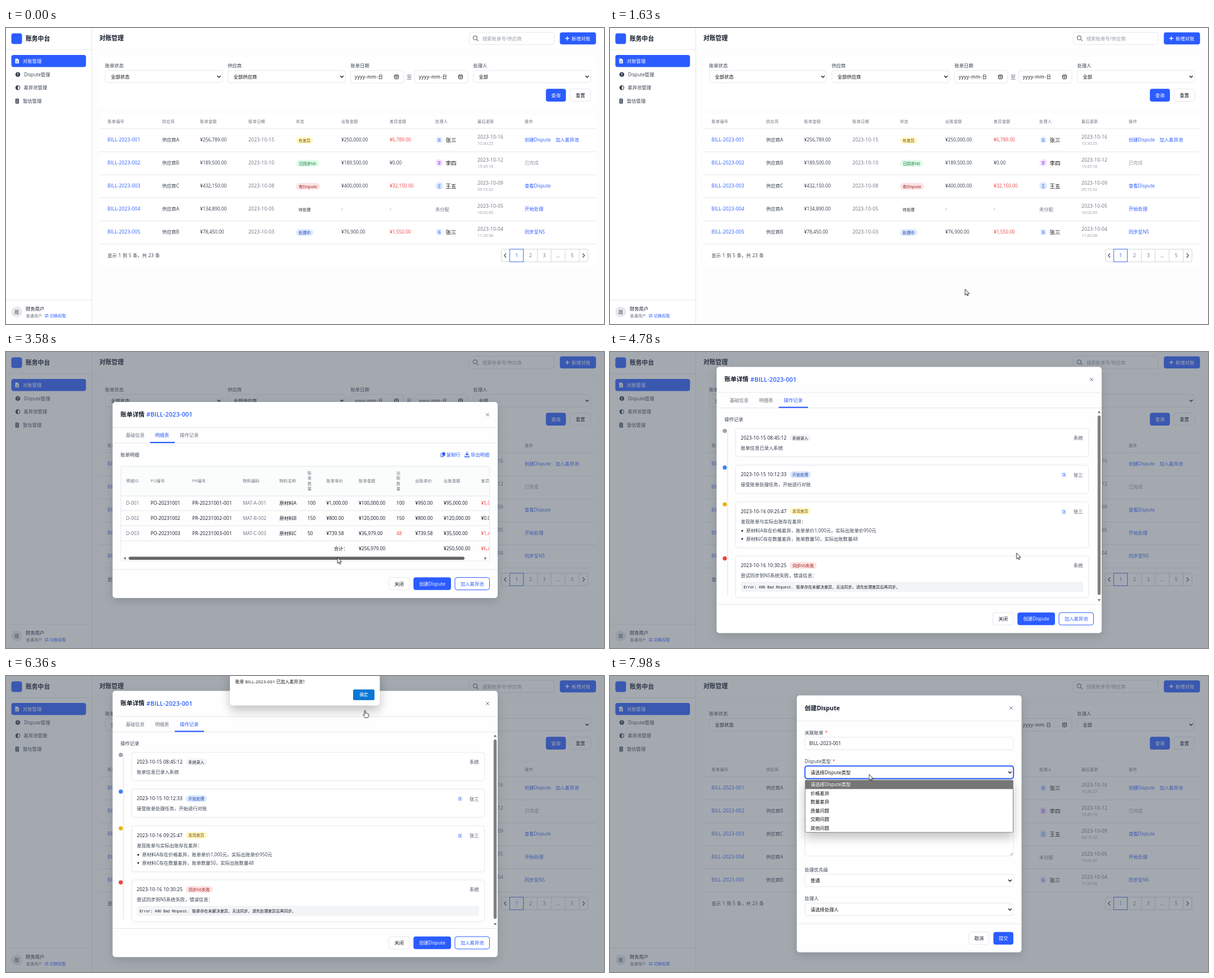
An HTML page for the animation above (8 s loop, 1063x527 px).

```html
<!DOCTYPE html>
<html lang="zh-CN">
<head>
<meta charset="utf-8">
<title>账务中台</title>
<style>
html, body { margin: 0; width: 100%; height: 100%; overflow: hidden; background: #fff; }
svg { display: block; width: 100%; height: 100%; }
text { font-family: "Open Sans", "Noto Sans CJK SC", "Noto Sans CJK", sans-serif; white-space: pre; }
.mono { font-family: "Liberation Mono", "Noto Sans CJK SC", monospace; }
.panel { filter: drop-shadow(0 5px 8px rgba(0, 0, 0, .14)); }
.popup { filter: drop-shadow(0 9px 9px rgba(0, 0, 0, .24)); }
</style>
</head>
<body>
<svg id="stage" viewBox="0 0 1063 527"></svg>
<script>
const LOOP = 8000;
const BLUE = '#2b5cff', INK = '#111827', TEXT = '#374151', GREY = '#6b7280', PALE = '#9299a5',
      LINE = '#e5e7eb', RED = '#ef4444';

// Drawing helpers; text is placed by its vertical middle.
const text = (x, y, str, fill = TEXT, size = 8.3, extra = '') =>
  `<text x="${x}" y="${y + size * .37}" font-size="${size}" fill="${fill}" ${/\d-\d/.test(str) ? 'letter-spacing=".16"' : ''} ${extra}>${str}</text>`;
const mid = (x, y, str, fill, size, extra = '') => text(x, y, str, fill, size, 'text-anchor="middle" ' + extra);
const MEDIUM = 'font-weight="500"', BOLD = 'font-weight="700"';
const rect = (x, y, w, h, fill, stroke = 'none', r = 4, extra = '') =>
  `<rect x="${x}" y="${y}" width="${w}" height="${h}" rx="${r}" fill="${fill}" stroke="${stroke}" ${extra}/>`;
const hline = (x1, x2, y, color = LINE) => `<path d="M${x1} ${y}H${x2}" stroke="${color}"/>`;
const dot = (x, y, r, fill) => `<circle cx="${x}" cy="${y}" r="${r}" fill="${fill}"/>`;
const stroke = (d, color = '#111', w = 1.2) =>
  `<path d="${d}" fill="none" stroke="${color}" stroke-width="${w}" stroke-linecap="round" stroke-linejoin="round"/>`;
const shape = (d, fill) => `<path d="${d}" fill="${fill}"/>`;

const button = (x, y, w, h, label, kind = 'plain') => {
  const [bg, border, ink] = {
    primary: [BLUE, 'none', '#fff'], plain: ['#fff', LINE, INK], outline: ['#fff', BLUE, BLUE]
  }[kind];
  return rect(x, y, w, h, bg, border) + mid(x + w / 2, y + h / 2, label, ink, 8.3, MEDIUM);
};
const box = (x, y, w, h = 22.5) => rect(x, y, w, h, '#fff', LINE);
const input = (x, y, w, str, fill = PALE) => box(x, y, w) + text(x + 7.5, y + 11, str, fill);
const select = (x, y, w, str) => box(x, y, w, 22) + text(x + 10, y + 11, str, '#111') +
  stroke(`M${x + w - 8.5} ${y + 10}l2.5 2.5 2.5 -2.5`, '#111', 1.3);
const dateInput = (x, y, w) => box(x, y, w) + text(x + 7.5, y + 11.5, 'yyyy-mm-日', '#111', 8.3, 'letter-spacing=".5"') +
  rect(x + w - 16.5, y + 8, 7, 7, 'none', '#222', 1) +
  stroke(`M${x + w - 16.5} ${y + 10.2}h7M${x + w - 14.5} ${y + 12.6}h3`, '#222', 1);
const textarea = (y, h, str) => box(346.5, y, 370.5, h) + text(353.5, y + 11.5, str, PALE) +
  stroke(`M711.5 ${y + h - 1.5}l4 -4M714 ${y + h - 1.5}l1.5 -1.5`, '#666', .7);
const label = (x, y, str, required) =>
  text(x, y, str + (required ? `<tspan dx="3" fill="${RED}">*</tspan>` : ''));
const tint = {
  yellow: ['#fef9c3', '#854d0e'], green: ['#dcfce7', '#166534'], red: ['#fee2e2', '#991b1b'],
  blue: ['#dbeafe', '#1e40af'], grey: ['#f3f4f6', '#1f2937'], none: ['none', '#1f2937']
};
const badge = (x, y, w, str, color) =>
  rect(x, y - 6, w, 12, tint[color][0], 'none', 6) + mid(x + w / 2, y, str, tint[color][1], 7.1, MEDIUM);
const group = (id, body) => `<g id="${id}">${body}</g>`;

function sidebar() {
  const item = (x, y, str) => text(x, y, str, TEXT, 8.3);
  return rect(0, 0, 152, 527, '#fff', 'none', 0) + `<path d="M152.5 0V527" stroke="${LINE}"/>` +
    rect(9.5, 9.5, 19, 19, BLUE) + text(35, 19, '账务中台', INK, 10.8, BOLD) +
    hline(0, 152, 38.5) + rect(9.5, 48.1, 132.7, 21.4, BLUE) +
    shape('M16.5 54.5h4l2.5 2.5v6h-6.5z', '#fff') + stroke('M18.3 59h3M18.3 61h3', BLUE, .8) +
    text(30, 58.7, '对账管理', '#fff', 8.3, MEDIUM) +
    dot(21, 82.7, 4.3, TEXT) + stroke('M21 80.3v2.6M21 84.8v.1', '#fff', 1.1) + item(32, 82.7, 'Dispute管理') +
    dot(21, 106.3, 4.2, TEXT) + shape('M21 103.2a3.1 3.1 0 0 1 0 6.2z', '#fff') + item(31.5, 106.3, '差异池管理') +
    rect(16.7, 125.8, 6.3, 8.6, TEXT, 'none', 1) + stroke('M18.2 127.7h3.4M18.4 130.2h3M18.4 132.3h3', '#fff', .8) +
    item(30, 130.2, '暂估管理') +
    hline(0, 152, 484.5) + dot(19, 505.5, 9.5, LINE) + mid(19, 505.5, '用', TEXT, 8.3) +
    text(35, 499.5, '财务用户', INK, 8.3) + text(35.5, 512.3, '普通用户', GREY, 7.1) +
    stroke('M69 510.8h6l-1.5 -1.5M75.5 513.8h-6l1.5 1.5', BLUE, 1) + text(78, 512.3, '切换权限', BLUE, 7.1);
}

const COLS = [180.5, 277.5, 345, 431, 515.5, 596, 682, 763, 838, 922];
const BILLS = [
  ['A', '256,789', '10-15', ['有差异', 30.5, 'yellow'], '¥250,000.00', '¥6,789.00', '张', '三', '16', '10:30:25', '创建Dispute', '加入差异池'],
  ['B', '189,500', '10-10', ['已同步NS', 41, 'green'], '¥189,500.00', '¥0.00', '李', '四', '12', '15:45:18', '已完成'],
  ['C', '432,150', '10-08', ['有Dispute', 42.5, 'red'], '¥400,000.00', '¥32,150.00', '王', '五', '09', '09:15:32', '查看Dispute'],
  ['A', '134,890', '10-05', ['待处理', 30.5, 'none'], '-', '-', '', '', '05', '16:02:45', '开始处理'],
  ['B', '78,450', '10-03', ['处理中', 30.5, 'blue'], '¥76,900.00', '¥1,550.00', '张', '三', '04', '11:20:38', '同步至NS']
];
const AVATAR = { 张: ['#f1f6ff', BLUE], 李: ['#f3e8ff', '#9333ea'], 王: ['#dbeafe', '#2563eb'] };

function billRow([vendor, sum, date, [state, w, color], paid, diff, family, given, day, time, action, extra = ''], i) {
  const y = 199 + 41 * i, [bg, ink] = AVATAR[family] || [];
  return text(COLS[0], y, `BILL-2023-00${i + 1}`, BLUE, 8.5) + text(COLS[1], y, '供应商' + vendor) +
    text(COLS[2], y, `¥${sum}.00`, TEXT, 8.4) + text(COLS[3], y, '2023-' + date, GREY, 8.5) +
    badge(COLS[4], y + 1, w, state, color) + text(COLS[5], y, paid, TEXT, 8.4) +
    text(COLS[6], y, diff, /[1-9]/.test(diff) ? RED : TEXT, 8.4) +
    (family ? dot(770, y, 6.8, bg) + mid(770, y, family, ink, 7.1) + text(781.5, y + .5, family + given, '#111', 9.5)
            : text(COLS[7], y + .5, '未分配', GREY)) +
    text(COLS[8], y - 5, '2023-10-' + day, GREY, 8.5) + text(COLS[8], y + 6, time, PALE, 7.1) +
    text(COLS[9], y, action, i === 1 ? PALE : BLUE) + text(977, y, extra, BLUE) + hline(166, 1048, y + 21.5);
}

function page() {
  const heads = ['账单编号', '供应商', '账单金额', '账单日期', '状态', '出账金额', '差异金额', '处理人', '最后更新', '操作'];
  const pages = ['', 1, 2, 3, '...', 5, ''];
  const edges = [880.5, 895.5, 920, 944.5, 969, 994, 1019, 1034.5];
  return rect(0, 0, 1063, 527, '#fdfdfd', 'none', 0) + rect(152, 0, 911, 37.5, '#fff', 'none', 0) +
    rect(166, 52, 882.5, 90, '#fff') + rect(166, 153, 882.5, 273, '#fff') + sidebar() +
    text(166, 18.5, '对账管理', INK, 10.8, BOLD) +
    box(823.5, 7.5, 151, 22) + stroke('M837 20.6l2.3 2.3', GREY, 1.3) +
    `<circle cx="834" cy="17.6" r="3.5" fill="none" stroke="${GREY}" stroke-width="1.2"/>` +
    text(847, 18.5, '搜索账单号/供应商', PALE) + addButton(BLUE) +
    [['账单状态', 176], ['供应商', 394], ['账单日期', 612.5], ['处理人', 830.5]].map(([s, x]) => label(x, 66.7, s)).join('') +
    select(176.5, 75.5, 208, '全部状态') + select(394.5, 75.5, 208.5, '全部供应商') +
    dateInput(612.5, 75.5, 94.5) + text(712, 87, '至', GREY, 9.5) + dateInput(726.5, 75.5, 94.5) +
    select(830.5, 75.5, 208.5, '全部') +
    button(959.7, 108.3, 35.6, 22.6, '查询', 'primary') + button(1002.5, 108.5, 37, 22, '重置') +
    heads.map((s, i) => text(COLS[i], 166.3, s, GREY, 7.1, 'letter-spacing=".36"')).join('') + hline(166, 1048, 179) +
    BILLS.map(billRow).join('') +
    text(180.5, 405, '显示 1 到 5 条，共 23 条', TEXT, 8.3, 'word-spacing=".5"') +
    rect(880.5, 393.8, 154, 22.4, '#fff', '#d1d5db', 3) +
    pages.map((s, i) => (i ? `<path d="M${edges[i]} 394v22" stroke="#d1d5db"/>` : '') +
      mid((edges[i] + edges[i + 1]) / 2, 405, s, s === 1 ? BLUE : GREY, 8.3)).join('') +
    rect(895.3, 393.8, 24.4, 22.4, 'none', BLUE, 0, 'stroke-width=".8"') +
    stroke('M888.7 401.8l-3 3.2 3 3.2M1025.4 401.8l3 3.2 -3 3.2', '#4b5563', 1.3);
}
const addButton = fill => rect(984.5, 7.8, 64.3, 21.4, fill) + stroke('M994.7 18.5h6M997.7 15.5v6', '#fff', 1.3) +
  text(1005.5, 18.5, '新增对账', '#fff', 8.3, MEDIUM);

// Modals
const modal = (x, y, w, h) => rect(0, 0, 1063, 527, '#4b5563', 'none', 0, 'opacity=".5"') +
  rect(x, y, w, h, '#fefefe', 'none', 5, 'class="panel"');
const cross = (x, y) => stroke(`M${x - 2.6} ${y - 2.6}l5.2 5.2m0 -5.2l-5.2 5.2`, GREY, 1);

function newBill() {
  return modal(332, 40, 399.5, 447) + text(346, 62.5, '新增对账单', INK, 10.7, BOLD) + hline(332, 731, 85.5) +
    label(346, 106, '供应商', 1) + select(346.5, 114.5, 178, '请选择供应商') +
    label(539, 106, '账单编号', 1) + input(539, 114.5, 178, '输入账单编号') +
    label(346, 157, '账单日期', 1) + dateInput(346.5, 165.5, 178) +
    label(539, 157, '账单金额', 1) + input(539, 165.5, 178, '输入金额') +
    label(346, 209.5, '币种', 1) + select(346.5, 218, 178, '人民币 (CNY)') +
    label(539, 209.5, '处理人') + input(539, 218, 178, '输入处理人姓名') +
    label(346, 260.5, '备注') + textarea(269, 46, '添加备注信息...') +
    label(346, 339, '账单文件上传') +
    rect(347, 348, 370, 72.5, 'none', '#d1d5db', 4, 'stroke-width="1.3" stroke-dasharray="3.5 2.2"') +
    shape('M524 379.5a6 6 0 0 1 -1.5 -11.5a8.5 8.5 0 0 1 15.5 -4.5a5 5 0 0 1 3.5 5.5a5.4 5.4 0 0 1 -2 10.5z', '#9ca3af') +
    stroke('M531.5 376v-8M528 371l3.5 -3.5 3.5 3.5', '#fff', 1.8) +
    mid(531.5, 392.7, '点击或拖拽文件上传', TEXT, 8.3) +
    mid(531.5, 405.5, '支持格式：PDF、Sheet、Text等，单个文件不超过10MB', PALE, 7.1) +
    hline(332, 731, 436) + button(613, 450.5, 36, 22, '取消') + button(656.5, 450.2, 60.5, 22.6, '创建对账单', 'primary');
}

function billModal(top, bottom, active, body) {
  const tabs = [['基础信息', 213, 203.5, 256], ['明细表', 265, 256, 300], ['操作记录', 309, 300, 352]];
  return modal(189.5, top, 684.5, bottom - top) + text(203.5, top + 22, '账单详情', INK, 10.7, BOLD) +
    text(249.5, top + 22, '#BILL-2023-001', BLUE, 10.9, 'font-weight="600"') + cross(856, top + 22.5) +
    hline(189.5, 874, top + 45.5) + hline(189.5, 874, top + 73) +
    tabs.map(([s, x, a, b], i) => text(x, top + 59.3, s, i === active ? BLUE : GREY, 8.3, MEDIUM) +
      (i === active ? rect(a, top + 71, b - a, 2.2, BLUE, 'none', 0) : '')).join('') + body +
    hline(189.5, 874, bottom - 51) + button(680.5, bottom - 36.5, 36.5, 22, '关闭') +
    button(724.3, bottom - 36.8, 66.7, 22.6, '创建Dispute', 'primary') +
    button(798, bottom - 36.5, 61.5, 22, '加入差异池', 'outline');
}

function infoBody() {
  const fields = [['账单编号', 'BILL-2023-001'], ['供应商', '供应商A'], ['账单日期', '2023-10-15'], ['处理人', '张三'],
    ['账单金额', '¥256,789.00'], ['出账金额', '¥250,000.00'], ['差异金额', '¥6,789.00'], ['币种', '人民币 (CNY)']];
  return text(203.5, 155, '账单信息', TEXT, 8.3, MEDIUM) + fields.map(([k, v], i) => {
    const x = 203.5 + 328 * (i % 2), y = 180 + 56 * (i >> 1);
    return text(x, y, k, GREY) + text(x, y + 15, v, k === '差异金额' ? RED : INK);
  }).join('');
}

function detailBody() {
  const xs = [213.5, 257, 331, 421, 486, 536, 569.5, 627, 694, 727.5, 778, 844.5];
  const heads = ['明细ID', 'PO编号', 'PR编号', '物料编码', '物料名称', '账单数量', '账单单价', '账单金额', '出账数量', '出账单价', '出账金额', '差异金额'];
  const rows = [['A', 100, '1,000.00', '100,000.00', 100, '950.00', '95,000.00', '5,000.00'],
    ['B', 150, '800.00', '120,000.00', 150, '800.00', '120,000.00', '0.00'],
    ['C', 50, '739.58', '36,979.00', 48, '739.58', '35,500.00', '1,479.00']];
  const cell = (c, y, s, fill = INK) => text(xs[c], y, s, fill, 8.4);
  const head = (s, i) => s.endsWith('数量')
    ? [...s].map((ch, k) => text(xs[i], 215.3 + 9.5 * k, ch, GREY, 7.1)).join('')
    : text(xs[i], 229.5, s, GREY, 7.1, 'letter-spacing=".36"');
  const row = ([m, n, price, sum, n2, price2, sum2, diff], i) => {
    const y = 269 + 26.8 * i, id = i + 1;
    return [`D-00${id}`, `PO-2023100${id}`, `PR-2023100${id}-001`, `MAT-${m}-00${id}`, '原材料' + m, n, '¥' + price, '¥' + sum, n2, '¥' + price2, '¥' + sum2, '¥' + diff]
      .map((s, c) => cell(c, y, s, c === 0 || c === 3 ? GREY : (c === 8 && n !== n2) || (c === 11 && i !== 1) ? RED : INK)).join('') +
      hline(204, 859, y + 13.5);
  };
  return text(203.5, 182.7, '账单明细', TEXT, 8.3, MEDIUM) +
    rect(775.5, 178.5, 5.2, 6.2, BLUE, 'none', 1) + stroke('M774.5 180.5h-1.5v6h5v-1', BLUE, 1) + text(783, 182.7, '复制行', BLUE) +
    stroke('M819.5 178.5v5M817.2 181.4l2.3 2.3 2.3 -2.3M816 185v1.8h7v-1.8', BLUE, 1.4) + text(826, 182.7, '导出明细', BLUE) +
    '<clipPath id="tableClip"><rect x="204" y="203" width="655.5" height="170"/></clipPath><g clip-path="url(#tableClip)">' +
    rect(204, 203.5, 656, 53, '#fbfcfc', 'none', 0) + heads.map(head).join('') + hline(204, 859, 256.3) + rows.map(row).join('') +
    text(583, 349.7, '合计：', INK, 8.3, MEDIUM) + cell(7, 349.7, '¥256,979.00') + cell(10, 349.7, '¥250,500.00') + cell(11, 349.7, '¥6,479.00', RED) +
    '</g>' + rect(204, 203.5, 655.5, 168.5, 'none', LINE) + rect(218, 364.5, 597, 5.4, '#666', 'none', 2.7) +
    shape('M213 364.4v5.6l-4 -2.8zM850.5 364.4v5.6l4 -2.8z', '#777');
}

function logBody() {
  const entry = (y, h, color, time, mark, tone, body, owner) => dot(204, y + 4.5, 3.7, color) +
    rect(223.5, y, 627, h, '#fff', LINE) + text(232.5, y + 17, time, INK, 8.3) +
    badge(319.5, y + 17, mark.length > 4 ? 48 : 37.5, mark, tone) + text(232.5, y + 35, body, TEXT) +
    text(824, y + 17.3, owner ? '张三' : '系统', '#4b5563') + (owner ? mid(807, y + 17.3, '张', BLUE, 7.1) : '');
  const bullet = (y, s) => dot(235, y, 1.5, INK) + text(242, y, s);
  return text(203.5, 120, '操作记录', TEXT, 8.3, MEDIUM) +
    `<path d="M209 140V433" stroke="${LINE}" stroke-width="1.5"/>` +
    entry(136, 50.5, '#a1a1b0', '2023-10-15 08:45:12', '系统录入', 'grey', '账单信息已录入系统') +
    entry(201.3, 50.5, '#3b82f6', '2023-10-15 10:12:33', '开始处理', 'blue', '接受账单处理任务，开始进行对账', 1) +
    entry(266.7, 82, '#eab308', '2023-10-16 09:25:47', '发现差异', 'yellow', '发现账单与实际出账存在差异：', 1) +
    bullet(318.3, '原材料A存在价格差异，账单单价1,000元，实际出账单价950元') +
    bullet(332.7, '原材料C存在数量差异，账单数量50，实际出账数量48') +
    entry(363, 74.5, RED, '2023-10-16 10:30:25', '同步NS失败', 'red', '尝试同步到NS系统失败，错误信息：') +
    rect(232.5, 409, 608.5, 18, '#f3f4f6', 'none', 2) +
    text(237.5, 418.2, 'Error: 400 Bad Request.', INK, 6.4, 'class="mono"') +
    text(331, 418.2, '账单存在未解决差异，无法同步。请先处理差异后再同步。', INK, 7.1) +
    rect(866.8, 113, 5.4, 319.5, '#808080', 'none', 2.7) +
    shape('M866.7 108.5h5.6l-2.8 -4zM866.7 440h5.6l-2.8 4z', '#777');
}

function alertBox() {
  return rect(398, -12, 266.5, 64.5, '#fff', 'none', 5, 'class="popup"') +
    text(407.5, 9.7, '账单 BILL-2023-001 已加入差异池！', '#111', 7.7) +
    rect(617, 24, 38, 19, '#0a78d4', 'none', 2) + mid(636, 33.5, '确定', '#fff', 7.6);
}

function dispute() {
  return modal(332, 34.5, 399.5, 457.5) + text(346, 57, '创建Dispute', INK, 10.7, BOLD) + cross(713, 57) + hline(332, 731, 80) +
    label(346, 100.7, '关联账单', 1) + input(346.5, 109, 370.5, 'BILL-2023-001', INK) +
    label(346, 152, 'Dispute类型', 1) + select(346.5, 160.5, 370.5, '请选择Dispute类型') +
    label(346, 203.5, '涉及金额', 1) + input(346.5, 212, 370.5, '输入金额') +
    label(346, 255, '问题描述', 1) + textarea(263.5, 57, '描述问题...') +
    label(346, 344.5, '处理优先级') + select(346.5, 353, 370.5, '普通') +
    label(346, 396, '处理人') + select(346.5, 404.5, 370.5, '请选择处理人') +
    hline(332, 731, 441) + button(638, 456, 36, 22, '取消') + button(681.5, 455.7, 35.5, 22.6, '提交', 'primary');
}

function dropdown() {
  const options = ['请选择Dispute类型', '价格差异', '数量差异', '质量问题', '交期问题', '其他问题'];
  return rect(346.5, 160.3, 370.7, 22.5, 'none', BLUE, 4, 'stroke-width="2"') +
    rect(347, 185.3, 369.5, 93, '#fff', '#888', 2, 'class="popup"') + rect(347, 185.5, 369.5, 15.7, '#767676', 'none', 1) +
    options.map((s, i) => text(356.5, 193.3 + 15.45 * i, s, i ? '#111' : '#fff')).join('');
}

// Timing, in milliseconds
const VISIBLE = {
  hover: [[290, 530]], newBill: [[530, 1630]], info: [[2080, 2970]], detail: [[2970, 4190]],
  log: [[4190, 7080]], alert: [[5880, 6730]], dispute: [[7080, LOOP]], dropdown: [[7570, LOOP]],
  hand: [[300, 530], [1440, 1630], [1990, 2080], [2640, 2970], [4130, 4190], [5500, 6730], [6980, 7080]]
};
const stops = [80, ...VISIBLE.hand.flat(), LOOP];
VISIBLE.arrow = stops.flatMap((t, i) => i % 2 ? [] : [[t, stops[i + 1]]]);

const PATH = [[0, 748, 54], [80, 748, 54], [340, 1014.3, 20], [680, 1014.3, 20], [1290, 592, 459], [1340, 592, 459],
  [1470, 631.3, 465], [1680, 631.3, 465], [2040, 214, 199], [2150, 214, 199], [2430, 267, 178], [2450, 267, 178],
  [2670, 280, 119], [3040, 280, 119], [3560, 589.3, 365.7], [3850, 589.3, 365.7], [4150, 326, 148], [4260, 326, 148],
  [4650, 718, 338], [4670, 718, 338], [4780, 722.7, 357.7], [5460, 728, 467], [5480, 728, 467], [5720, 810, 472],
  [5940, 810, 472], [6360, 638.3, 61.5], [6680, 637, 35], [6760, 637, 35], [7040, 757, 474], [7110, 757, 474],
  [7520, 460.5, 175], [LOOP, 460.5, 175]];
const CLICKS = [530, 1630, 2060, 2970, 4170, 5880, 6730, 7060, 7570];
const pct = t => t / LOOP * 100 + '%';
const placeAt = t => PATH.filter(p => p[0] <= t).pop();

let css = '';
const animate = (id, frames, easing) => {
  css += `@keyframes ${id}{${frames}}#${id}{animation:${id} ${LOOP}ms ${easing} infinite}`;
};
for (const [id, spans] of Object.entries(VISIBLE))
  animate(id, '0%{visibility:hidden}' + spans.map(([a, b]) =>
    `${pct(a)}{visibility:visible}${pct(b)}{visibility:hidden}`).join(''), 'step-end');
animate('cursor', PATH.map(([t, x, y]) => `${pct(t)}{transform:translate(${x}px,${y}px)}`).join(''), 'ease-in-out');
CLICKS.forEach((t, i) => animate('ripple' + i,
  `0%,${pct(t)}{r:2px;opacity:0}${pct(t + 80)}{r:9px;opacity:.8}${pct(t + 380)},100%{r:11px;opacity:0}`, 'linear'));

const ripples = CLICKS.map((t, i) => {
  const [, x, y] = placeAt(t);
  return `<circle id="ripple${i}" cx="${x}" cy="${y - 1}" r="9" fill="#5c8dfa" stroke="#c3d6ff"/>`;
}).join('');
const pointer = d => `<path d="${d}" fill="#fff" stroke="#111" stroke-width=".9" stroke-linejoin="round"/>`;
const cursor = group('arrow', pointer('M0 0V10.6L2.5 8.4L4.1 12L5.6 11.3L4.1 7.9H7.4Z')) +
  group('hand', pointer('M-1 1C-1 -.4 .9 -.4 .9 1V5C1.2 4.3 2.6 4.4 2.8 5.4C3.3 4.8 4.4 5 4.6 6C5.2 5.5 6.3 5.8 6.3 6.9V9.2C6.3 11 5.4 11.6 5.2 12.6H-.4C-.8 11.3 -2.4 9.8 -3.3 8.2C-3.6 7.2 -2.3 6.7 -1 8Z'));

document.head.append(Object.assign(document.createElement('style'), { textContent: css }));
document.getElementById('stage').innerHTML = page() + group('hover', addButton('#1d4ed8')) +
  group('newBill', newBill()) + group('info', billModal(61, 467, 0, infoBody())) +
  group('detail', billModal(89, 438, 1, detailBody())) + group('log', billModal(26.5, 500.5, 2, logBody())) +
  group('alert', alertBox()) + group('dispute', dispute()) + group('dropdown', dropdown()) +
  ripples + group('cursor', cursor);
</script>
</body>
</html>
```
